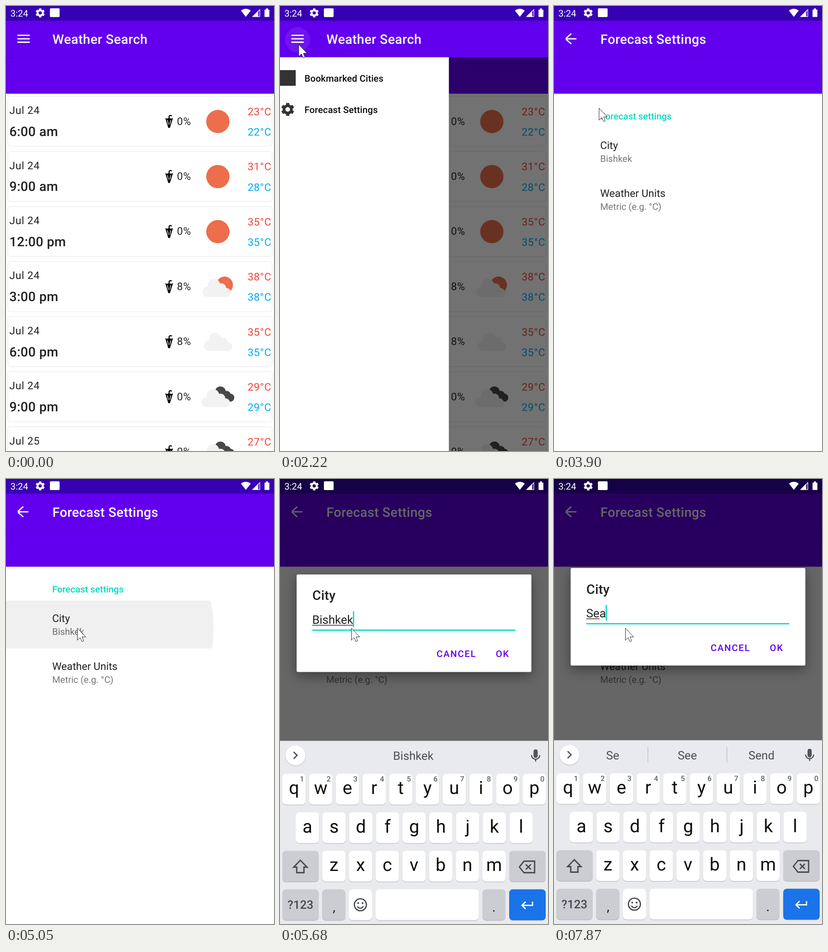
An HTML page for the animation above (8 s loop, 580x965 px).

```html
<!DOCTYPE html>
<html lang="en">
<head>
<meta charset="utf-8">
<title>Weather Search</title>
<style>
  html, body { margin: 0; width: 100%; height: 100%; overflow: hidden; background: #fff; }
  svg { display: block; width: 100%; height: 100%; }
  text { font-family: Roboto, "Noto Sans", sans-serif; white-space: pre; text-rendering: geometricPrecision; }
  .m { font-weight: 500; }
  .card { fill: #fff; filter: drop-shadow(0 .8px 1px rgba(0,0,0,.22)); }
  .panel { fill: #fff; filter: drop-shadow(0 9px 13px rgba(0,0,0,.38)); }
  .key { filter: drop-shadow(0 1.2px .4px rgba(0,0,0,.26)); }
</style>
</head>
<body>
<svg id="stage" viewBox="0 0 580 965"></svg>
<script>
const LOOP = 8000, PURPLE = '#6200ee', TEAL = '#03dac5', INK = '#212121';
const stage = document.getElementById('stage');

// ---- drawing helpers ----
const text = (x, y, size, str, color = INK, extra = '') =>
  `<text x="${x}" y="${y}" font-size="${size}" fill="${color}" ${extra}>${str}</text>`;
const rect = (x, y, w, h, fill, extra = '') =>
  `<rect x="${x}" y="${y}" width="${w}" height="${h}" fill="${fill}" ${extra}/>`;
const circle = (x, y, r, fill, extra = '') =>
  `<circle cx="${x}" cy="${y}" r="${r}" fill="${fill}" ${extra}/>`;
const line = (d, color, width, extra = '') =>
  `<path d="${d}" fill="none" stroke="${color}" stroke-width="${width}" ${extra}/>`;
const group = (id, body, extra = '') => `<g id="${id}" ${extra}>${body}</g>`;
const spaced = em => `letter-spacing="${em}em"`;
const MED = 'class="m"', MID = 'text-anchor="middle"';

function gear(x, y, r, color) {
  let teeth = '';
  for (let i = 0; i < 6; i++) {
    const a = Math.PI / 3 * i + Math.PI / 6, c = Math.cos(a), s = Math.sin(a);
    teeth += `M${x + c * r * .6} ${y + s * r * .6}L${x + c * r} ${y + s * r}`;
  }
  return circle(x, y, r * .57, 'none', `stroke="${color}" stroke-width="${r * .42}"`) +
    line(teeth, color, r * .5);
}

// ---- forecast list ----
const cloud = (x, y) => `<g fill="#f2f2f2" transform="translate(${x} ${y})">` +
  circle(11, 28, 11, '') + circle(25, 13, 13.3, '') + circle(41, 20, 10.5, '') +
  circle(52, 29.5, 9.7, '') + rect(11, 20, 41, 19.2, '') + '</g>';
const sun = () => circle(458.5, 250.5, 25.2, '#ec6e4c');
const sunCloud = () => circle(473, 246.8, 18.2, '#ec6e4c') + cloud(425, 233.6);
const plainCloud = () => cloud(428, 231.3);
const darkCloud = () => '<g fill="#484848">' + circle(464, 239.5, 11.5, '') +
  circle(477.5, 246.5, 9, '') + circle(485.3, 252.3, 8.8, '') + rect(466, 247, 19, 14, '') + '</g>' + cloud(423, 234);
const umbrella =
  line('M353 245V239.5a3 3 0 0 1 5.5-.8', '#000', 2.4) +
  '<path d="M344.5 242.5q4.2 3 8.3 0 4.2 3 8.7 0L354.8 264.3h-3.6Z"/>' +
  line('M349.3 247.5L351.4 257M356.4 247.5L354.4 257', '#fff', 1.4);

const forecast = [
  ['Jul 24', '6:00 am', 0, sun, 23, 22],
  ['Jul 24', '9:00 am', 0, sun, 31, 28],
  ['Jul 24', '12:00 pm', 0, sun, 35, 35],
  ['Jul 24', '3:00 pm', 8, sunCloud, 38, 38],
  ['Jul 24', '6:00 pm', 8, plainCloud, 35, 35],
  ['Jul 24', '9:00 pm', 0, darkCloud, 29, 29],
  ['Jul 25', '12:00 am', 0, darkCloud, 27, 27]
];
const body1 = spaced(.03125), title6 = MED + ' ' + spaced(.0125);
const page = rect(0, 32, 580, 933, '#fff') + rect(0, 32, 580, 158.2, PURPLE);
const listRows = forecast.map(([day, hour, rain, icon, hi, lo], i) =>
  `<g transform="translate(0 ${i * 119.4})">` +
  rect(4.5, 196.5, 571, 107.3, '#fff', 'rx="5" class="card"') +
  text(7.2, 234.3, 22.7, day, INK, body1) + text(7.2, 282, 28.4, hour, INK, title6) +
  umbrella + text(370, 257.6, 22.7, rain + '%', INK, body1) + icon() +
  text(574.5, 237, 22.7, hi + '°C', '#f44336', 'text-anchor="end" ' + body1) +
  text(574.5, 281.2, 22.7, lo + '°C', '#03a9f4', 'text-anchor="end" ' + body1) + '</g>').join('');

// ---- settings, drawer, dialog ----
const settings = page +
  text(100, 246, 19.9, 'Forecast settings', TEAL, MED) +
  text(100, 310.2, 22.7, 'City') + text(100, 338.2, 19.9, 'Bishkek', '#757575') +
  text(100, 414, 22.7, 'Weather Units') + text(100, 442.2, 19.9, 'Metric (e.g. °C)', '#757575') +
  '<g clip-path="url(#cityRow)">' + circle(154, 323, 0, '#000', 'id="cityRipple"') + '</g>';

const item = MED + ' ' + spaced(.00714);
const drawer = rect(0, 105, 395.5, 870, '#fff', 'style="filter:drop-shadow(0 0 2px rgba(0,0,0,.15))"') +
  '<g clip-path="url(#itemRow)">' + circle(97, 221, 0, '#000', 'id="itemRipple"') + '</g>' +
  rect(30, 139, 34, 34, '#333') + text(83, 164, 19.9, 'Bookmarked Cities', '#0a0a0a', item) +
  gear(46.7, 224.3, 14, '#333') + text(83, 232, 19.9, 'Forecast Settings', '#0a0a0a', item);

const button = MED + ' ' + spaced(.0893);
const dialog = rect(36, 0, 508, 211.5, '#fff', 'rx="3" class="panel"') +
  text(70, 55.5, 28.4, 'City', INK, title6) +
  text(69.7, 107, 25.55, '', INK, 'id="field"') +
  rect(70, 109.5, 0, 1.4, INK, 'id="compose"') +
  rect(70, 119.5, 439.5, 2.7, TEAL) + rect(158, 80, 2.7, 34, TEAL, 'id="caret"') +
  text(339, 179.5, 19.9, 'CANCEL', PURPLE, button) + text(467, 179.5, 19.9, 'OK', PURPLE, button);

// ---- keyboard ----
const PITCH = 57.8, GREY = '#cbcdd2', GLYPH = '#45484c';
const key = (x, y, w, fill = '#fff') => rect(x, y, w, 67, fill, 'rx="8" class="key"');
const letterRow = (letters, x0, y) => [...letters].map((c, i) => {
  const x = x0 + i * PITCH;
  return key(x, y, 50.5) + text(x + 25.3, y + 44, 39, c, '#0c0c0c', MID + ' data-letter="' + c + '"');
}).join('');
const hints = [...'1234567890'].map((n, i) =>
  text(47.5 + i * PITCH, 654.5, 16, n, '#5f6368', MID + ' ' + MED)).join('');
const keyboard = rect(0, 566.5, 580, 420, '#e8eaed') +
  circle(33.5, 598, 21.5, '#fff', 'style="filter:drop-shadow(0 1px 1px rgba(0,0,0,.2))"') +
  line('M29.5 590.5L37 598L29.5 605.5', '#4a4d51', 2.7, 'id="chevron"') +
  [127, 288.5, 449].map((x, i) => text(x, 607.5, 25.2, '', '#4a4d51', `${MID} id="word${i}"`)).join('') +
  line('M203.3 581V614.5M374.3 581V614.5', '#c3c5c9', 1.6, 'id="dividers"') +
  rect(548.7, 585, 9, 18.5, '#505357', 'rx="4.5"') +
  line('M544.3 597.5a8.9 8.9 0 0 0 17.8 0M553.2 606V611.5', '#505357', 2.5) +
  letterRow('qwertyuiop', 5, 638) + hints + letterRow('asdfghjkl', 34, 721.5) +
  key(5, 805, 78.5, GREY) + line('M44 825.5L58.5 840.5H51.8V852.5H36.2V840.5H29.5Z', GLYPH, 2.9, 'id="shift"') +
  letterRow('zxcvbnm', 91.3, 805) +
  key(496, 805, 79, GREY) + line('M518 840L528 827.5H551V852.5H528ZM532 834.5L543 845.5M543 834.5L532 845.5', GLYPH, 2.8) +
  key(5, 888.5, 78.5, GREY) + text(44.2, 931, 25.5, '?123', GLYPH, MID + ' ' + MED) +
  key(91.3, 888.5, 50, GREY) + text(117, 937, 28, ',', '#111', MID) +
  key(149, 888.5, 50) + circle(174, 922, 13, 'none', `stroke="${GLYPH}" stroke-width="2.7"`) +
  circle(169.3, 918.5, 2, GLYPH) + circle(178.7, 918.5, 2, GLYPH) +
  line('M167.5 925.5Q174 934 180.5 925.5', GLYPH, 2.6) +
  key(207, 888.5, 223.5) + key(438, 888.5, 50, GREY) + text(463, 937, 28, '.', '#111', MID) +
  key(496, 888.5, 79, '#1a73e8') + line('M546.5 915.5V923.3H524M531.5 915.5L523.7 923.3L531.5 931', '#fff', 2.8);

const statusIcons = text(9.5, 22.5, 20, '3:24', '#fff') + gear(74, 15, 9.8, '#fff') +
  rect(95, 5, 21, 19, '#fff', 'rx="2"') +
  '<g fill="#fff"><path d="M508.5 10Q519 2 529.7 10L519 23.5Z"/>' +
  '<path d="M532.5 23.5L546 10V23.5Z"/><path d="M559.5 8h3v-2.8h4.5v2.8h3v15.7h-10.5Z"/></g>' +
  line('M534.5 22.8H549.3V8Z', '#fff', 1.3);

stage.innerHTML = `<defs>
  <clipPath id="cityRow">${rect(0, 264, 580, 103.5, '#000')}</clipPath>
  <clipPath id="itemRow">${rect(0, 191, 395, 67, '#000')}</clipPath>
  <linearGradient id="shade" x2="0" y2="1"><stop stop-opacity=".07"/><stop offset="1" stop-opacity="0"/></linearGradient>
  </defs>` +
  group('list', page + listRows) + group('settings', settings) +
  rect(0, 111, 580, 854, '#000', 'id="scrim"') + group('drawer', drawer) +
  rect(0, 111, 580, 6, 'url(#shade)') + rect(0, 31, 580, 80, PURPLE) +
  circle(38, 73, 27, '#fff', 'id="menuRipple"') +
  line('', '#fff', 2.8, 'id="menu"') + text(100.5, 82.2, 28.4, '', '#fff', 'id="title" ' + title6) +
  rect(0, 0, 580, 32, '#3700b3') + rect(0, 0, 580, 965, '#000', 'id="dim"') + statusIcons +
  group('dialog', dialog) + group('keyboard', keyboard) +
  '<path id="cursor" d="M.5 .5V26.5L6.5 21L10.3 29.5L14 27.9L10.5 19.5H18.5Z" fill="#fff" stroke="#111" stroke-width=".9"/>';

const el = {};
stage.querySelectorAll('[id]').forEach(n => el[n.id] = n);
const letters = [...stage.querySelectorAll('[data-letter]')];
const set = (id, attrs) => { for (const k in attrs) el[id].setAttribute(k, attrs[k]); };
const write = (id, str) => { if (el[id].textContent !== str) el[id].textContent = str; };

// ---- timing: first and last change of each burst, and the number of steps ----
const bursts = [
  [0, 0, 1], [370, 660, 5], [990, 1460, 8], [1730, 1730, 1], [1940, 2420, 8], [2620, 3040, 7],
  [3240, 3900, 10], [4230, 4580, 6], [4780, 4780, 1], [4980, 5120, 3], [5260, 5750, 8], [5890, 5890, 1],
  [6220, 6220, 1], [6430, 6430, 1], [6690, 7010, 6], [7410, 7670, 4], [7870, 7870, 1]
];
const lastOf = (table, t) => table.filter(row => row[0] <= t).pop();
function hold(t) {
  const [from, to, n] = lastOf(bursts, t);
  if (n < 2) return from;
  const step = (to - from) / (n - 1);
  return from + Math.min(n - 1, Math.floor((t - from) / step + 1e-6)) * step;
}
const ramp = (t, a, b) => Math.max(0, Math.min(1, (t - a) / (b - a)));
const easeOut = (t, a, b, power) => 1 - (1 - ramp(t, a, b)) ** power;
const mix = (a, b, p) => a + (b - a) * p;

const pointer = [
  [370, 376, 849], [660, 129, 352], [920, 129, 352], [1255, 55, 1], [1325, 38, 40], [1460, 40, 83],
  [2550, 40, 83], [3040, 97, 221], [4160, 97, 221], [4580, 154, 323], [LOOP, 154, 323]
];
// time, field text, underlined letters
const typing = [
  [0, 'Bishkek', 0], [5540, 'Bishkek', 7], [6220, 'Bishke', 6], [6690, 'Bishk', 5], [6754, 'Bish', 4],
  [6818, 'Bis', 3], [6882, 'Bi', 2], [6946, 'B', 1], [7010, '', 0], [7490, 'S', 1], [7670, 'Se', 1], [7870, 'Sea', 2]
];
const words = [
  [0, '', 'Bishkek', ''], [6430, 'Bishke', 'Bishkek', ''], [6946, 'B', 'Be', 'But'],
  [7010, '', '', ''], [7580, 'S', 'So', 'She'], [7870, 'Se', 'See', 'Send']
];

function menuIcon(p) {
  const at = (x, y, x2, y2) => `${mix(x, x2, p)} ${mix(y, y2, p)}`;
  const d = [-1, 1].map(s => `M${at(-13.4, 7.4 * s, -11.5, s * .6)}L${at(13.4, 7.4 * s, .3, 11.2 * s)}`).join('') +
    `M${at(-13.4, 0, -10.5, 0)}L${at(13.4, 0, 11.4, 0)}`;
  set('menu', { d, transform: `translate(${mix(38, 37.1, p)} 71.1) rotate(${180 * p - 180})` });
}

function draw(now) {
  const t = hold(now);

  const i = Math.max(1, pointer.findIndex(k => k[0] >= t));
  const [a, b] = [pointer[i - 1], pointer[i]], p = ramp(t, a[0], b[0]);
  set('cursor', { transform: `translate(${mix(a[1], b[1], p)} ${mix(a[2], b[2], p)})`, opacity: t < 370 ? 0 : 1 });

  const grow = ramp(t, 1730, 2000);
  set('menuRipple', {
    cx: mix(40, 38, grow), cy: mix(83, 73, grow), r: mix(21, 27, grow),
    opacity: t < 1730 ? 0 : .2 * (1 - ramp(t, 2010, 2350))
  });

  const open = easeOut(t, 2008, 2520, 5) - easeOut(t, 3310, 3822, 5);
  set('drawer', { transform: `translate(${395.5 * (open - 1)})`, opacity: open > 0 ? 1 : 0 });
  set('scrim', { opacity: .6 * open });
  set('itemRipple', { r: mix(22, 310, ramp(t, 3240, 3460)), opacity: t < 3240 ? 0 : .1 * (1 - ramp(t, 3400, 3680)) });

  set('settings', { opacity: ramp(t, 3310, 3680) });
  write('title', t < 3300 ? 'Weather Search' : 'Forecast Settings');
  menuIcon(ramp(t, 3310, 3680));

  set('cityRipple', { r: t < 4980 ? 21 : mix(150, 440, ramp(t, 4980, 5120)), opacity: t < 4780 ? 0 : .06 * (1 - ramp(t, 5340, 5600)) });

  set('dim', { opacity: .6 * easeOut(t, 5230, 5380, 2) });
  const show = easeOut(t, 5230, 5365, 3), y = mix(393, 193, easeOut(t, 5480, 5820, 3)), s = .9 + .1 * show;
  set('dialog', { opacity: show, transform: `translate(290 ${y + 106}) scale(${s}) translate(-290 -106)` });

  const [, typed, marked] = lastOf(typing, t);
  write('field', typed);
  const width = n => n ? el.field.getSubStringLength(0, n) : 0;
  set('caret', { x: 69.2 + width(typed.length) });
  set('compose', { width: width(marked) });

  set('keyboard', { transform: `translate(0 ${400 * (1 - easeOut(t, 5390, 5730, 3))})` });
  const [, ...row] = lastOf(words, t);
  row.forEach((w, n) => write('word' + n, w));
  set('dividers', { opacity: row[0] ? 1 : 0 });
  set('chevron', { transform: t >= 7010 && t < 7580 ? 'rotate(180 33.3 598)' : '' });
  const upper = t >= 7410 && t < 7580;
  set('shift', { fill: upper ? GLYPH : 'none' });
  letters.forEach(n => {
    const c = n.dataset.letter, glyph = upper ? c.toUpperCase() : c;
    if (n.textContent !== glyph) n.textContent = glyph;
  });
}

function tick() {
  draw(performance.now() % LOOP);
  requestAnimationFrame(tick);
}
tick();
</script>
</body>
</html>
```
